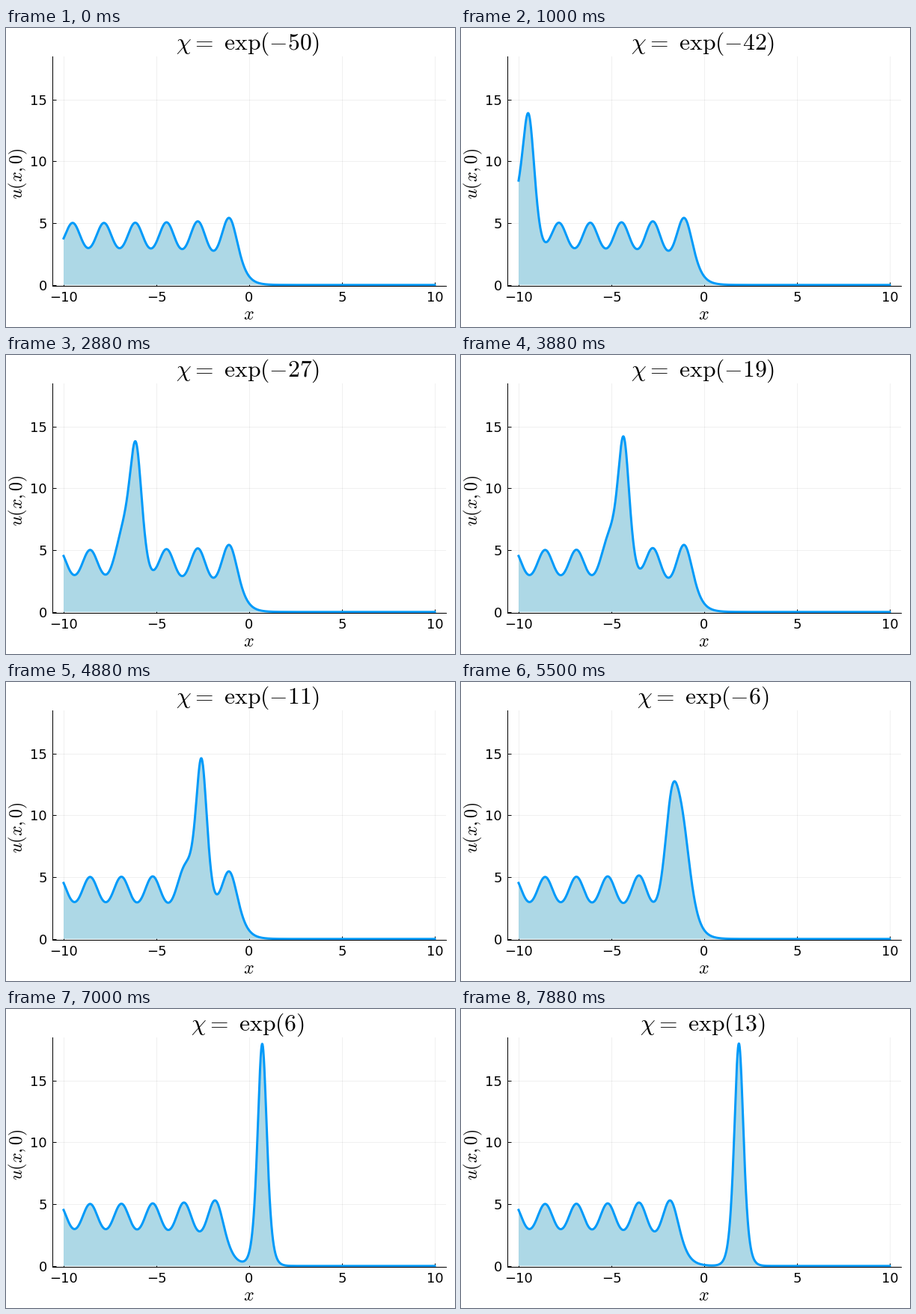
These frames come from a looping animation (600x400 px, 8000 ms). A matplotlib script:

```python
import numpy as np
import matplotlib.pyplot as plt
from matplotlib.animation import FuncAnimation

# KdV soliton gas on the spectral band [1, 2], crossed by one soliton with
# eigenvalue 3 and norming constant chi:  u = 2 (log tau)''  at t = 0.
W, H, DPI = 600, 400, 100
FRAMES, INTERVAL = 64, 125
FIRST_POWER = -50
KAPPA0 = 3.0
N_GAS, N_BASIS = 32, 24
STEP = 0.01

plt.rcParams.update({
    "font.family": "DejaVu Sans",
    "mathtext.fontset": "cm",
    "axes.unicode_minus": True,
})


def basis(kappa, p=np.sqrt(3)):
    """Rows b_i with b_i . b_j = 1 / (kappa_i + kappa_j)."""
    kappa = np.atleast_1d(kappa)[:, None]
    z = (kappa - p) / (kappa + p)
    return np.sqrt(2 * p) / (kappa + p) * z ** np.arange(N_BASIS)


def log_tau_parts(x):
    """log tau of the gas, and log q, where tau = tau_gas * (1 + chi * q)."""
    theta = np.pi * np.arange(1, N_GAS + 1) / (N_GAS + 1)
    eta = 1.5 + 0.5 * np.cos(theta)
    c = np.sin(theta) / (2 * np.sqrt(N_GAS + 1))
    amp = c * np.exp(-np.outer(x, eta))
    rows = amp[:, :, None] * basis(eta)
    eye = np.broadcast_to(np.eye(N_BASIS), (len(x), N_BASIS, N_BASIS))
    r = np.linalg.qr(np.concatenate([eye, rows], axis=1), mode="r")
    diag = np.abs(np.diagonal(r, axis1=1, axis2=2))
    log_gas = 2 * np.log(diag).sum(axis=1)

    m = np.broadcast_to(basis(KAPPA0).T, (len(x), N_BASIS, 1))
    s = np.linalg.solve(np.swapaxes(r, 1, 2), m)
    log_q = -2 * KAPPA0 * x + np.log((s ** 2).sum(axis=(1, 2)))
    return log_gas, log_q


n = int(round(20 / STEP)) + 1
grid = -10 + STEP * np.arange(-1, n + 1)
xs = grid[1:-1]
log_gas, log_q = log_tau_parts(grid)


def profile(power):
    log_tau = log_gas + np.logaddexp(0, power + log_q)
    return 2 * np.diff(log_tau, 2) / STEP ** 2


def px(v):
    return v * 72 / DPI


def label(x, y, text, size, **kw):
    return fig.text(x / W, 1 - y / H, text, fontsize=size, ha="center",
                    va="baseline", color="black", **kw)


fig = plt.figure(figsize=(W / DPI, H / DPI), dpi=DPI, facecolor="white")
left, right, top, bottom = 62.1, 587.9, 37.8, 345.4
ax = fig.add_axes([left / W, 1 - bottom / H,
                   (right - left) / W, (bottom - top) / H])
ax.set_xlim(-10.6, 10.6)
ax.set_ylim(-0.1, 18.5)
ax.set_xticks(range(-10, 11, 5))
ax.set_yticks(range(0, 16, 5))
ax.set_axisbelow(True)
ax.grid(color="black", alpha=0.06, linewidth=px(1))
ax.tick_params(direction="in", length=px(5), width=px(1), pad=px(7),
               labelsize=13)
for side, spine in ax.spines.items():
    spine.set_visible(side in ("left", "bottom"))
    spine.set_linewidth(px(1))
    spine.set_zorder(0.9)

fill, = ax.fill([-10, 10], [0, 0], color="lightblue", linewidth=0, zorder=2)
line, = ax.plot([], [], color="#009AF9", linewidth=px(3), zorder=3)

title = label(323, 28.5, "", 22.7)
label(324.5, 390.5, "$x$", 17.3)
label(22.2, 194.5, "$u(x,0)$", 17.3, rotation=90, rotation_mode="anchor")


def update(i):
    power = FIRST_POWER + i
    u = profile(power)
    line.set_data(xs, u)
    fill.set_xy(np.column_stack([np.r_[xs[0], xs, xs[-1]], np.r_[0, u, 0]]))
    title.set_text(rf"$\chi =\ \mathrm{{exp}}({power})$")
    return fill, line, title


anim = FuncAnimation(fig, update, frames=FRAMES, interval=INTERVAL,
                     repeat=True, repeat_delay=0, blit=False)
plt.show()
```
